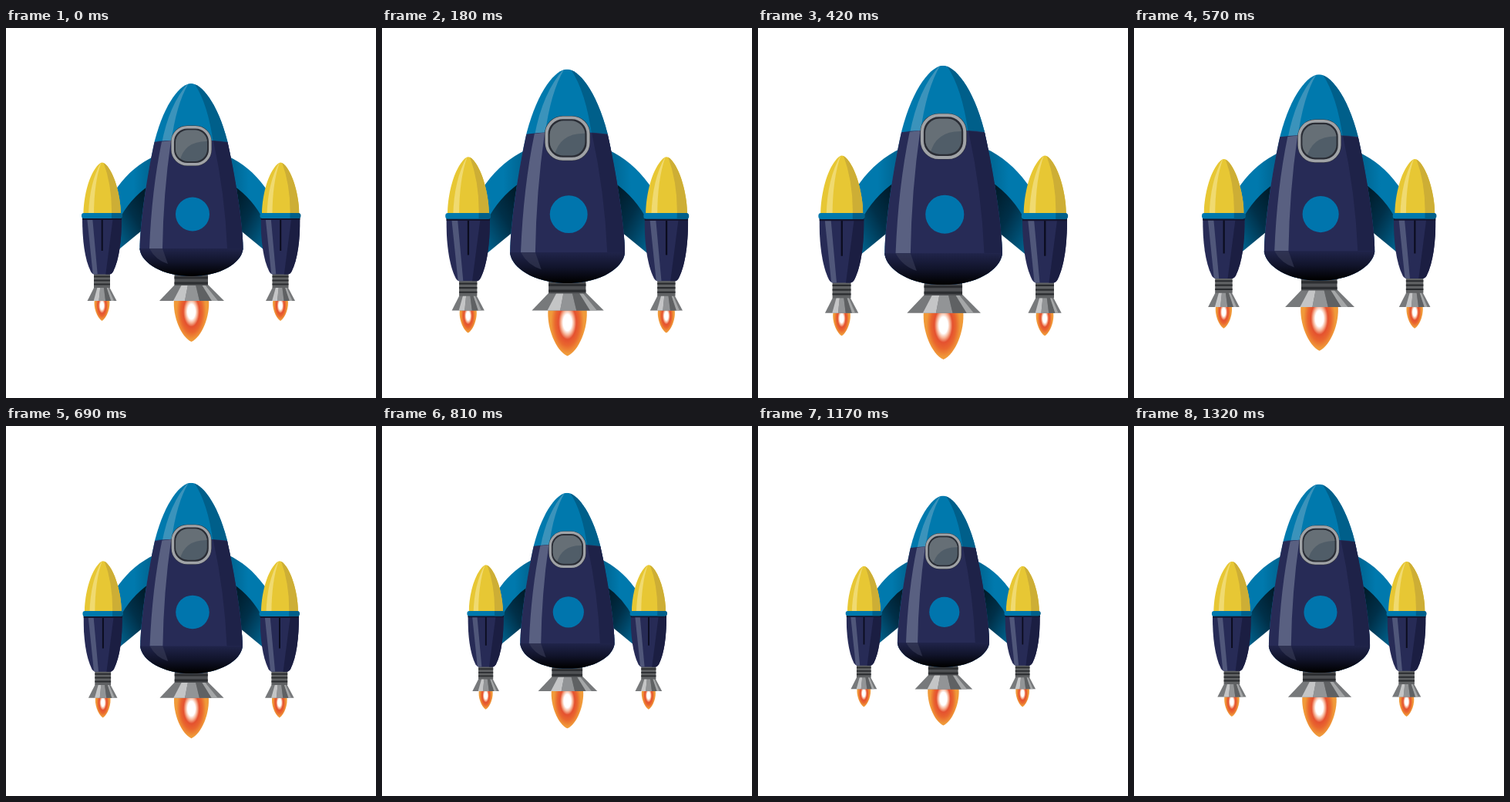
An HTML page for the animation above (1.35 s loop, 480 by 480 pixels).

```html
<!DOCTYPE html>
<html lang="en">
<head>
<meta charset="utf-8">
<title>Rocket</title>
<style>
  @property --step { syntax: "<number>"; inherits: false; initial-value: 0; }
  html, body { margin: 0; width: 100%; height: 100%; overflow: hidden; background: #fff; }
  svg { display: block; width: 100%; height: 100%; }
  /* 45 discrete poses along one sine wave */
  #rocket {
    transform-origin: 240px 240px;
    transform: scale(calc(1 + .149 * sin(var(--step) * 8deg)));
    animation: pulse 1350ms steps(45) infinite;
  }
  @keyframes pulse { from { --step: 0; } to { --step: 45; } }
</style>
</head>
<body>
<svg viewBox="0 0 480 480">
  <defs>
    <clipPath id="hull">
      <path d="M240 72C227 72 206 96 193 146C183 190 173.500 255 173.500 287C176 305 203 322 240.500 322C278 322 305 305 307.500 287C307.500 255 297 190 287 146C274 96 253 72 240 72Z"/>
    </clipPath>
    <clipPath id="cap"><path d="M100.500 242C100.500 222 106 196 116 182Q121 174.500 124.700 174.500Q128.500 174.500 133.500 182C143 196 149 222 149 242Z"/></clipPath>
    <clipPath id="pod"><path d="M99 246H150C150 275 147 300 139 316Q137 319.500 134 319.500H115Q112 319.500 110 316C102 300 99 275 99 246Z"/></clipPath>
    <clipPath id="glass"><rect x="220" y="132.500" width="41" height="40.500" rx="16"/></clipPath>
    <linearGradient id="belly" x2="0" y2="1">
      <stop stop-color="#20244a"/><stop offset=".45" stop-color="#11142b"/><stop offset=".9" stop-color="#000"/>
    </linearGradient>
    <linearGradient id="under" x1="1" y1="0" x2="0" y2="1">
      <stop stop-color="#00141f"/><stop offset=".4" stop-color="#003049"/><stop offset=".85" stop-color="#006d9c"/>
    </linearGradient>
    <linearGradient id="sweep">
      <stop offset=".6" stop-color="#0079ad"/><stop offset="1" stop-color="#00618c"/>
    </linearGradient>
    <radialGradient id="fire" cx=".5" cy=".29" r=".66" gradientTransform="translate(.18 0) scale(.64 1)">
      <stop offset=".26" stop-color="#fff"/><stop offset=".4" stop-color="#f6b295"/>
      <stop offset=".54" stop-color="#e4512f"/><stop offset=".74" stop-color="#e9662e"/>
      <stop offset="1" stop-color="#f09a39"/>
    </radialGradient>

    <g id="fin">
      <path d="M185 200L130 238V298L140 292.500L182 258Z" fill="url(#under)"/>
      <path d="M192 166.500C174 175 158 188 145 206L126 232V262L146 250Q160 222 186 204Z" fill="url(#sweep)"/>
    </g>

    <g id="cone">
      <path d="M219 333H262L283 354H199Z" fill="#77797b"/>
      <path d="M228 333H236L232 354H217Z" fill="#c4c5c6"/>
      <path d="M236 333H246L251 354H232Z" fill="#929496"/>
      <path d="M246 333H254L267 354H251Z" fill="#5f6163"/>
      <path d="M254 333H258L275 354H267Z" fill="#a5a7a8"/>
    </g>

    <g id="booster">
      <path d="M115 352H134C136 362 131 376 124.500 380C118 376 113 362 115 352Z" fill="url(#fire)"/>
      <use href="#cone" transform="matrix(.4524 0 0 .857 15.500 50.600)"/>
      <path d="M114 317H135V337H114Z" fill="#606264"/>
      <path d="M114 322.500H135M114 327.500H135M114 332.500H135" stroke="#2a2c2f" stroke-width="2"/>
      <g clip-path="url(#pod)">
        <path d="M98 245H151V322H98Z" fill="#272b56"/>
        <path d="M105 245H112L119 322H113Z" fill="#50577a"/>
        <path d="M139 245H151V322H129Z" fill="#1b1e42"/>
        <path d="M124.700 246V289" stroke="#0b0c1e" stroke-width="2"/>
        <path d="M98 246H151V249H98Z" fill="#14162f"/>
      </g>
      <g clip-path="url(#cap)">
        <path d="M100 173H150V243H100Z" fill="#e7c734"/>
        <path d="M124 173Q108 200 107 243H114Q114 200 124 173Z" fill="#f0da70"/>
        <path d="M126 173Q138 205 137 243H151V173Z" fill="#cdae35"/>
      </g>
      <rect x="98" y="240" width="52.500" height="7" rx="3" fill="#0079ad"/>
      <path d="M137 240H147.500A3.500 3.500 0 0 1 147.500 247H137Z" fill="#00608b"/>
    </g>
  </defs>

  <g id="rocket">
    <use href="#fin"/>
    <use href="#fin" transform="matrix(-1 0 0 1 480.500 0)"/>

    <path d="M218 352H263C265 374 254 401 240.500 407C227 401 216 374 218 352Z" fill="url(#fire)"/>
    <use href="#cone"/>
    <path d="M218.500 318H262V334H218.500Z" fill="#4e5053"/>
    <path d="M218.500 324H262M218.500 331H262" stroke="#2c2e31" stroke-width="3"/>

    <g clip-path="url(#hull)">
      <path d="M170 70H310V325H170Z" fill="#0079ad"/>
      <path d="M238 70Q212 97 202 150H214Q221 97 238 70Z" fill="#3b93bb"/>
      <path d="M243 70Q262 97 269 150H310V70Z" fill="#005f8a"/>
      <path d="M170 151Q240 139 310 151V325H170Z" fill="#272b56"/>
      <path d="M202 147.500L214 146Q204 215 203 286H186Q189 210 202 147.500Z" fill="#596081"/>
      <path d="M269 146.500L310 151V286H287Q284 215 269 146.500Z" fill="#1e2248"/>
      <path d="M170 286H310V325H170Z" fill="url(#belly)"/>
      <path d="M186 286H203L210 306Q194 301 186 286Z" fill="#3c415c" opacity=".55"/>
    </g>

    <rect x="214" y="126.500" width="53" height="52.500" rx="21" fill="#33363d"/>
    <rect x="216.200" y="128.700" width="48.600" height="48.100" rx="19" fill="#2a2d35" stroke="#a0a3a7" stroke-width="3.500"/>
    <g clip-path="url(#glass)">
      <path d="M219 132H262V174H219Z" fill="#505d68"/>
      <path d="M219 132H262V147Q231 146 225 174H219Z" fill="#666f76"/>
    </g>

    <circle cx="242" cy="241.500" r="22" fill="#0075ad"/>

    <use href="#booster"/>
    <use href="#booster" x="231.500"/>
  </g>
</svg>
</body>
</html>
```
